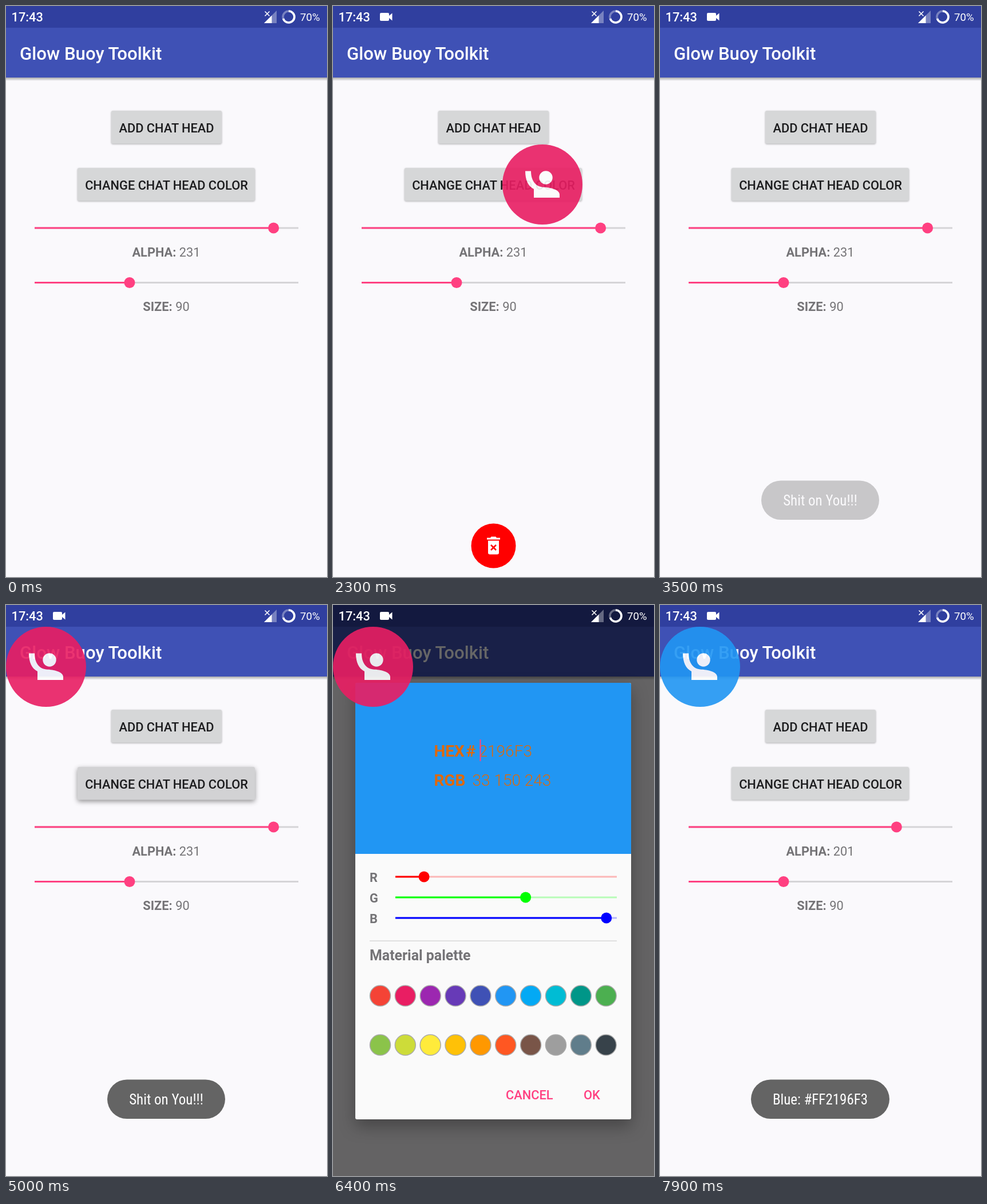
An HTML page that plays this animation: 561x998 px, repeating every 8000 ms.

```html
<!DOCTYPE html>
<html lang="en">
<head>
<meta charset="utf-8">
<title>Floating head demo</title>
<style>
  html, body { margin: 0; width: 100%; height: 100%; overflow: hidden; background: #faf9fc; }
  svg { display: block; width: 100%; height: 100%; }
  text { font-family: Roboto, sans-serif; font-size: 21.8px; white-space: pre; }
  .medium { font-weight: 500; }
  .bold { font-weight: 700; }
  .mid { text-anchor: middle; }
  .gray { fill: #747376; }
  .accent { fill: #ff4081; }
  .value { font-size: 28px; font-weight: 300; }
  .value.bold { font-weight: 700; }
  .button { fill: #d6d7d8; filter: drop-shadow(0 1.5px 1.5px rgba(0,0,0,.3)); }
  .button.raised { fill: #d2d2d4; filter: drop-shadow(0 3px 4px rgba(0,0,0,.42)); }
  #card { filter: drop-shadow(0 12px 14px rgba(0,0,0,.3)); }
  #toast text { font-family: "Roboto Condensed", "Liberation Sans Narrow", Roboto, sans-serif; font-stretch: 75%; font-size: 25px; fill: #fff; }
</style>
</head>
<body>
<svg viewBox="0 0 561 998" preserveAspectRatio="none">
  <defs>
    <linearGradient id="barShadow" x2="0" y2="1">
      <stop stop-color="#000" stop-opacity=".32"/>
      <stop offset="1" stop-color="#000" stop-opacity="0"/>
    </linearGradient>
  </defs>

  <rect width="561" height="998" fill="#faf9fc"/>
  <rect y="125" width="561" height="6" fill="url(#barShadow)"/>
  <rect y="38" width="561" height="87" fill="#3f51b5"/>
  <rect width="561" height="38" fill="#303f9f"/>
  <text class="medium" x="24" y="93.5" fill="#fff" style="font-size:31.2px">Glow Buoy Toolkit</text>

  <rect id="addButton" class="button" x="184" y="183" width="193" height="57.5" rx="3"/>
  <text class="medium mid" x="280.5" y="221" fill="#1b1b1d">ADD CHAT HEAD</text>
  <rect id="colorButton" class="button" x="125" y="283" width="310" height="57.5" rx="3"/>
  <text class="medium mid" x="280.5" y="321" fill="#1b1b1d">CHANGE CHAT HEAD COLOR</text>

  <g id="settings"></g>
  <text class="mid gray" x="280" y="438"><tspan class="bold">ALPHA:</tspan> <tspan id="alphaValue"></tspan></text>
  <text class="mid gray" x="280" y="533"><tspan class="bold">SIZE:</tspan> 90</text>

  <rect id="dim" width="561" height="998"/>

  <g fill="#fff">
    <text class="medium" x="9.5" y="27">17:43</text>
    <path id="camera" d="M84 12h12q2 0 2 2v3l5.500-4.500v13l-5.500-4.500v3q0 2-2 2h-12q-2 0-2-2v-10q0-2 2-2z"/>
    <path d="M451 30L473 8V30Z" opacity=".35"/>
    <path d="M451 30L464.500 16.500V30Z"/>
    <path d="M452.500 9.500l8 8m0-8l-8 8" stroke="#fff" stroke-width="1.600"/>
    <g fill="none" stroke="#fff" stroke-width="3.600">
      <circle cx="494" cy="19" r="10" opacity=".35"/>
      <circle cx="494" cy="19" r="10" pathLength="100" stroke-dasharray="70 30" transform="rotate(-90 494 19)"/>
    </g>
    <text x="514" y="26" style="font-size:18.7px">70%</text>
  </g>

  <g id="dialog">
    <rect id="card" x="39" y="136" width="482" height="763" rx="3" fill="#fafafa"/>
    <path id="preview" d="M39 435V139q0-3 3-3H518q3 0 3 3V435Z"/>
    <g id="readout">
      <text class="value bold" y="265">HEX</text>
      <text class="value bold" y="265" dx="56">#</text>
      <text class="value" id="hex" y="265" dx="78"></text>
      <text class="value bold" y="316">RGB</text>
      <text class="value" id="rgb" y="316" dx="67"></text>
      <rect class="accent" y="235" width="2" height="38"/>
    </g>
    <g id="channels"></g>
    <rect x="64" y="586.500" width="432" height="1.200" fill="#d0d0d0"/>
    <text class="bold gray" x="64" y="621" style="font-size:24.9px">Material palette</text>
    <g id="palette" stroke="#aaa" stroke-width="1.500"></g>
    <text class="medium accent" x="302" y="864">CANCEL</text>
    <text class="medium accent" x="438" y="864">OK</text>
  </g>

  <g id="trash" transform="translate(280.5 943.5)">
    <circle r="39" fill="red"/>
    <path d="M-11.500-14h6l1.500-2h8l1.500 2h6v3h-23zM-9.500-9h19v21q0 3-3 3h-13q-3 0-3-3z" fill="#fff"/>
    <path d="M-4.500-1.500l9 9m0-9l-9 9" stroke="red" stroke-width="2.600"/>
  </g>

  <g id="head" opacity=".906">
    <circle id="headDisc" r="70"/>
    <circle cx="6" cy="-12" r="11.700" fill="#fff"/>
    <path d="M-30-23.500h10C-20-8-13 3 0 4.500C14 5 30 9 30 17.500V23H-15V8C-25 3-30-8-30-23.500Z" fill="#fff"/>
  </g>

  <g id="toast">
    <rect id="pill" y="829.500" height="68.500" rx="34.250" fill="#646464"/>
    <text class="mid" id="message" x="280" y="873"></text>
  </g>
</svg>
<script>
const LOOP = 8000, STEP = 100;
const el = id => document.getElementById(id);
const show = (id, on) => { el(id).style.display = on ? '' : 'none'; };
const within = (t, from, to) => t >= from && t < to;

const PINK = [233, 30, 99], BLUE = [33, 150, 243];
const css = rgb => `rgb(${rgb})`;

// Where the finger drags the head, one point every 200 ms.
const DRAG_START = 700, DRAG_STEP = 200, DRAG_END = 3400;
const drag = [
  [70, 108], [90, 130], [160, 220], [330, 430], [480, 380], [465, 265], [250, 200],
  [75, 290], [366, 312], [450, 560], [330, 740], [110, 690], [100, 640], [270, 850]
];

// [time, value] pairs, linear between them
const dialogFade = [[5200, 0], [5300, .12], [5600, .85], [5700, 1], [6600, 1], [6700, .75], [6800, .47], [7000, .06], [7100, 0]];
const dimFade = [[5200, 0], [5600, .27], [5900, .6], [6600, .6], [6800, .44], [7100, 0]];
const toastFade = [[3300, 0], [3500, .33], [3700, .82], [3900, 1], [5400, 1], [5600, .82], [5900, 0],
  [6400, 0], [6500, .33], [6700, .9], [6800, 1]];

function at(keys, t) {
  const i = keys.findIndex(k => k[0] > t);
  if (i < 0) return keys[keys.length - 1][1];
  if (i === 0) return keys[0][1];
  const [t0, a] = keys[i - 1], [t1, b] = keys[i];
  return a + (b - a) * (t - t0) / (t1 - t0);
}

function dragPoint(t) {
  const u = Math.max(0, Math.min(drag.length - 1, (t - DRAG_START) / DRAG_STEP));
  const i = Math.floor(u), f = u - i;
  const p = k => drag[Math.max(0, Math.min(drag.length - 1, k))];
  return [0, 1].map(n => {
    const [a, b, c, d] = [p(i - 1)[n], p(i)[n], p(i + 1)[n], p(i + 2)[n]];
    return b + f / 2 * (c - a + f * (2 * a - 5 * b + 4 * c - d + f * (3 * (b - c) + d - a)));
  });
}

function slider(parent, x, y, width, max, color, track) {
  parent.insertAdjacentHTML('beforeend', `<g>
    <rect x="${x}" y="${y - 1.5}" width="${width}" height="3" ${track}/>
    <rect x="${x}" y="${y - 1.5}" height="3" fill="${color}"/>
    <circle cy="${y}" r="9.5" fill="${color}"/></g>`);
  const [, fill, thumb] = parent.lastElementChild.children;
  return value => {
    const length = width * value / max;
    fill.setAttribute('width', length);
    thumb.setAttribute('cx', x + length);
  };
}

const [setAlpha, setSize] = [[388, 255], [483.5, 250]].map(([y, max]) =>
  slider(el('settings'), 50, y, 461, max, '#ff4081', 'fill="#d5d4d7"'));
setSize(90);

const channels = ['red', 'lime', 'blue'].map((color, i) => {
  const y = 475 + 36 * i;
  el('channels').insertAdjacentHTML('beforeend',
    `<text class="bold gray" x="64" y="${y + 8.5}">${'RGB'[i]}</text>`);
  return slider(el('channels'), 109, y, 387, 255, color, `fill="${color}" opacity=".27"`);
});

const swatches = ('F44336 E91E63 9C27B0 673AB7 3F51B5 2196F3 03A9F4 00BCD4 009688 4CAF50 ' +
  '8BC34A CDDC39 FFEB3B FFC107 FF9800 FF5722 795548 9E9E9E 607D8B 37424A').split(' ');
el('palette').innerHTML = swatches.map((c, i) =>
  `<circle cx="${82.5 + i % 10 * 43.85}" cy="${i < 10 ? 683 : 769}" r="18" fill="#${c}"/>`).join('');

function drawDialog(t) {
  const opacity = at(dialogFade, t);
  el('dialog').setAttribute('opacity', opacity);
  show('dialog', opacity > 0);
  el('dim').setAttribute('opacity', at(dimFade, t));
  const picked = t >= 6400, rgb = picked ? BLUE : PINK;
  el('preview').setAttribute('fill', css(rgb));
  el('hex').textContent = rgb.map(v => v.toString(16).padStart(2, '0')).join('').toUpperCase();
  el('rgb').textContent = rgb.join(' ');
  const readout = el('readout'), left = picked ? 176.5 : 184.5;
  readout.setAttribute('fill', css(rgb.map(v => 255 - v)));
  readout.querySelectorAll('text').forEach(n => n.setAttribute('x', left));
  readout.querySelector('rect').setAttribute('x', left + 80);
  channels.forEach((set, i) => set(rgb[i]));
}

function drawHead(t) {
  const dragged = within(t, DRAG_START, DRAG_END);
  show('head', dragged || within(t, 4500, 6600) || t >= 7100);
  show('trash', within(t, 1600, DRAG_END));
  const [x, y] = dragged ? dragPoint(t) : drag[0];
  el('head').setAttribute('transform', `translate(${x} ${y})`);
  el('headDisc').setAttribute('fill', css(t >= 7100 ? BLUE : PINK));
}

function drawToast(t) {
  const second = t >= 6400, width = second ? 242 : 206;
  el('toast').setAttribute('opacity', at(toastFade, t));
  el('message').textContent = second ? 'Blue: #FF2196F3' : 'Shit on You!!!';
  el('pill').setAttribute('width', width);
  el('pill').setAttribute('x', 280 - width / 2);
}

function draw(t) {
  show('camera', t >= 200);
  el('addButton').classList.toggle('raised', within(t, 200, 800) || within(t, 4300, 4600));
  el('colorButton').classList.toggle('raised', within(t, 4800, 5700));
  const alpha = t >= 7900 ? 201 : 231;
  setAlpha(alpha);
  el('alphaValue').textContent = alpha;
  drawDialog(t);
  drawHead(t);
  drawToast(t);
}

const start = performance.now();
function tick() {
  const t = (performance.now() - start) % LOOP;
  draw(Math.floor(t / STEP) * STEP);
  requestAnimationFrame(tick);
}
tick();
</script>
</body>
</html>
```
